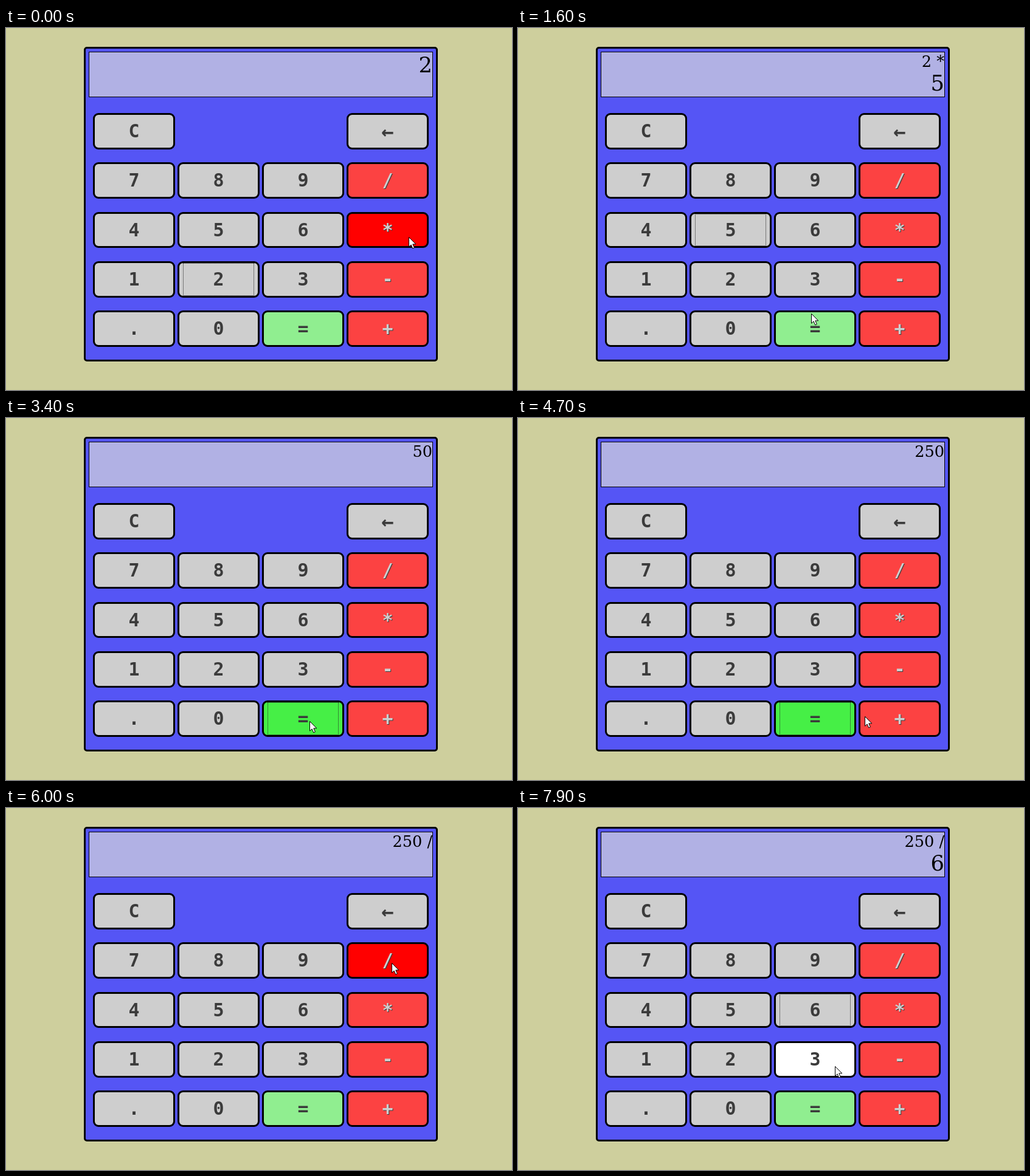
These frames come from a looping animation (832x596 px, 8000 ms). An HTML page:

```html
<!DOCTYPE html>
<html lang="en">
<head>
<meta charset="utf-8">
<title>Calculator</title>
<style>
*, *::after { box-sizing: border-box; }
html, body { margin: 0; width: 100%; height: 100%; overflow: hidden; background: #cecf9d; }
div, svg { position: absolute; }
#panel { left: 128px; top: 31px; width: 582px; height: 518px; background: #5555f5; border: 3px solid #000; border-radius: 5px; }
#screen { left: 136px; top: 39px; width: 566px; height: 75px; background: #b1b1e4; border: 1px solid #000;
  font-family: "DejaVu Serif", serif; color: #000; text-align: right; }
#screen span { display: block; white-space: pre; }
.small { font-size: 25.6px; line-height: 30px; }
.large { font-size: 35.2px; line-height: 41px; }
.key { width: 135px; border: 3px solid #000; border-radius: 9px; background: #cecece; color: #3b3b3b;
  font: bold 30px "DejaVu Sans Mono", monospace; text-align: center; }
.key.back { font-size: 34px; }
.key.op { background: #fc4242; color: #cecece; text-shadow: 1px 1px #3b3b3b; }
.key.equals { background: #90ee90; }
.key.hover { background: #fff; }
.key.op.hover { background: #f00; }
.key.equals.hover { background: #46ef46; }
.key.focus::after { content: ""; position: absolute; left: 6px; top: 0; width: 117px; height: 100%; border: 1px dotted #222; }
.key.op.hover::after { display: none; }
.key.down { text-indent: 2px; }
.key.down::after { left: 7px; }
#cursor { left: 0; top: 0; overflow: visible; }
</style>
</head>
<body>
<div id="panel"></div>
<div id="screen"><span></span><span></span></div>
<svg id="cursor" width="13" height="20"><path d="M.5.5V16.2L4.1 12.9 6.7 18.9 9.4 17.8 6.8 11.9H11.8Z" fill="#fff" stroke="#000"/></svg>
<script>
const STEP = 100, STEPS = 80, HOVER_LAG = 0.8;
const cursor = document.getElementById("cursor");
const lines = document.querySelectorAll("#screen span");
const styles = { "/": "op", "*": "op", "-": "op", "+": "op", "=": "equals", "←": "back" };

const keys = ["C  ←", "789/", "456*", "123-", ".0=+"].flatMap((row, r) => [...row].map((label, c) => {
  const el = document.createElement("div");
  const x = 143 + 139 * c, y = Math.round(140 + 81.3 * r), h = Math.round(199.6 + 81.3 * r) - y;
  el.textContent = label;
  el.style.cssText = `left:${x}px;top:${y}px;height:${h}px;line-height:${h - 6}px`;
  if (label !== " ") document.body.insertBefore(el, cursor);
  return { label, el, x, y, h, base: "key " + (styles[label] || "") };
}));

// pointer moves: first step, last step, curve control point, end point
const home = [662, 344];
const moves = [
  [3, 9, [500, 375], [378, 355]],
  [13, 19, [474, 446], [499, 499]],
  [46, 51, [600, 500], [684, 430]],
  [51, 59, [608, 373], [634, 255]],
  [60, 66, [520, 320], [460, 338]],
  [75, 80, [500, 380], [523, 429]]
];
// presses: step down, step up, key
const presses = [[-2, -1, "2"], [1, 2, "*"], [12, 13, "5"], [23, 24, "="], [33, 34, "="], [44, 45, "="], [59, 60, "/"], [70, 72, "6"]];

function pointer(s) {
  let pos = home;
  for (const [from, to, ctrl, end] of moves) {
    if (s <= from) break;
    const left = (1 - Math.min(1, (s - from) / (to - from))) ** 2, u = 1 - left;
    pos = pos.map((p, i) => left * left * p + 2 * left * u * ctrl[i] + u * u * end[i]);
  }
  return pos.map(Math.round);
}

// the two display lines after all keys released by step s
function display(s) {
  let value = "", op = "", entry = "", operand = 0, pending = false;
  for (const [, up, key] of presses) {
    if (up > s) break;
    if (key === "=") {
      if (entry) operand = +entry;
      value = op === "*" ? value * operand : value / operand;
      entry = "";
      pending = false;
    } else if (styles[key]) {
      if (entry) value = +entry;
      op = key;
      entry = "";
      pending = true;
    } else entry += key;
  }
  return [value + (pending ? " " + op : ""), entry];
}

function draw(s) {
  const [x, y] = pointer(s), [hx, hy] = pointer(s - HOVER_LAG);
  cursor.style.transform = `translate(${x}px,${y}px)`;
  const [, up, pressed] = presses.findLast(p => p[0] <= s);
  for (const k of keys) {
    const hover = hx >= k.x && hx < k.x + 135 && hy >= k.y && hy < k.y + k.h;
    const focus = k.label === pressed;
    k.el.className = k.base + (hover ? " hover" : "") + (focus ? " focus" : "") + (focus && s < up ? " down" : "");
  }
  display(s).forEach((text, i) => {
    lines[i].textContent = text;
    lines[i].className = i ? "large" : "small";
  });
}

const start = performance.now();
let last = -1;
function tick() {
  const s = Math.floor((performance.now() - start) / STEP) % STEPS;
  if (s !== last) draw(last = s);
  requestAnimationFrame(tick);
}
tick();
</script>
</body>
</html>
```
